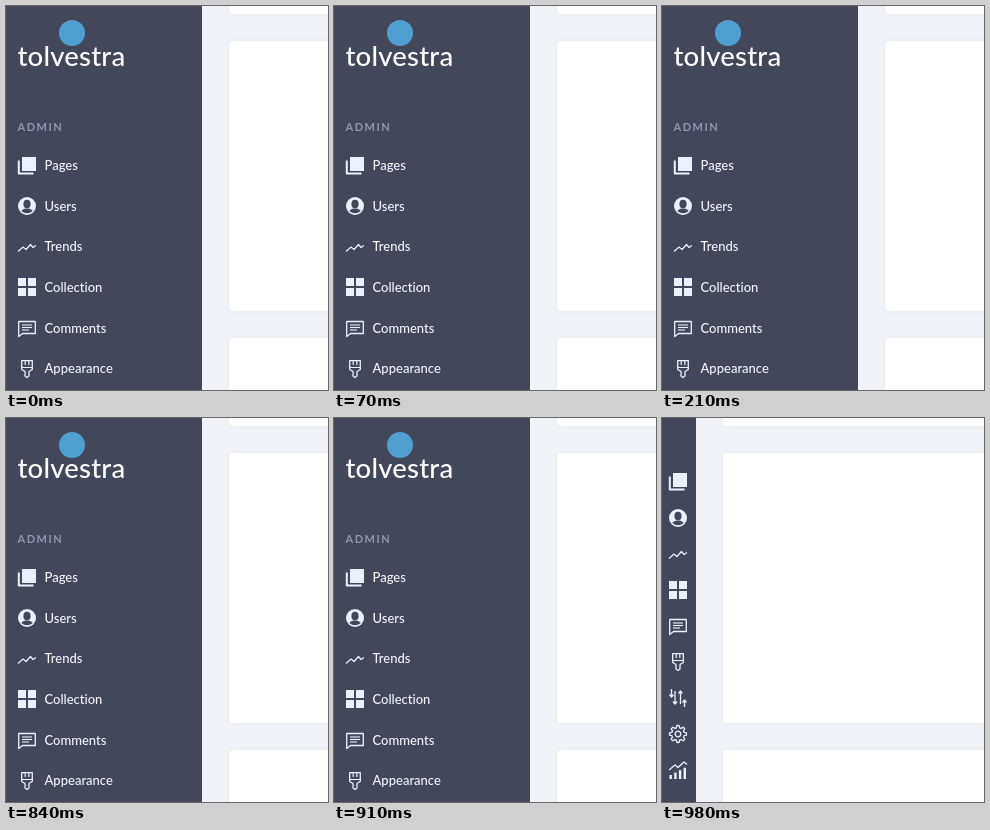
An HTML page with a canvas for the animation above (2.38 s loop, 322 by 384 pixels).

```html
<!DOCTYPE html>
<html lang="en">
<head>
<meta charset="utf-8">
<title>Collapsing sidebar</title>
<style>
  html, body { margin: 0; width: 100%; height: 100%; overflow: hidden; background: #f2f3f8; }
  canvas { display: block; width: 322px; height: 384px; }
</style>
</head>
<body>
<canvas id="stage"></canvas>
<script>
const W = 322, H = 384, LOOP = 2380, COLLAPSE_AT = 980;
const SIDEBAR = '#42485a', PAGE = '#f2f3f8', ICON = '#e9f1fb';
const ICONS = ['pages', 'user', 'trend', 'grid', 'comment', 'brush', 'arrows', 'gear', 'chart'];
const LABELS = ['Pages', 'Users', 'Trends', 'Collection', 'Comments', 'Appearance'];

const canvas = document.getElementById('stage');
const ctx = canvas.getContext('2d');
const ratio = window.devicePixelRatio || 1;
canvas.width = W * ratio;
canvas.height = H * ratio;
ctx.scale(ratio, ratio);

function stroke(path, width = 1.3) {
  ctx.lineWidth = width;
  ctx.stroke(new Path2D(path));
}

function oval(x, y, rx, ry, color) {
  ctx.fillStyle = color;
  ctx.beginPath();
  ctx.ellipse(x, y, rx, ry, 0, 0, Math.PI * 2);
  ctx.fill();
}

function text(str, x, y, font, color, spacing = 0) {
  ctx.font = font + ' Lato, sans-serif';
  ctx.letterSpacing = spacing + 'px';
  ctx.fillStyle = color;
  ctx.fillText(str, x, y);
}

// Each icon is drawn around its own centre.
const draw = {
  pages() {
    ctx.fillRect(-5, -9, 14, 14);
    stroke('M-8.2 -5.5V7.6H6.5', 2);
  },
  user() {
    oval(0, 0, 9, 9, ICON);
    oval(0, -2, 3.6, 4.3, SIDEBAR);
    ctx.fill(new Path2D('M-5.8 5Q-4.5 3.3 -1.7 2.6H1.7Q4.5 3.3 5.8 5Q0 9.6 -5.8 5'));
  },
  trend() {
    stroke('M-9 4.5L-4 0L-1 2.5L3.5 -2.5L6 .5L9 -1.5', 1.2);
  },
  grid() {
    for (const x of [-9, 1])
      for (const y of [-9, 1]) ctx.fillRect(x, y, 8, 8);
  },
  comment() {
    stroke('M-8.3 -6.5H8.3V5.5H-4.5L-8.3 8.5Z');
    for (let i = 0; i < 3; i++) stroke(`M-5 ${i * 2.5 - 3}H${i < 2 ? 5 : 2}`, 1.1);
  },
  brush() {
    stroke('M-5.3 -8.3H5.3V.5L2 2.5V7L0 8.6L-2 7V2.5L-5.3 .5Z');
    stroke('M-5.3 -1.5H5.3M-1.8 -8V-4M1.8 -8V-4', 1.2);
  },
  arrows() {
    arrow(-6.5, -9, -1);
    arrow(-3, -7, 6);
    arrow(2.5, 6, -7);
    arrow(6.5, 9, 2);
  },
  gear() {
    const steps = 96;
    ctx.beginPath();
    for (let i = 0; i < steps; i++) {
      const a = i / steps * Math.PI * 2;
      const tooth = Math.max(-1, Math.min(1, Math.cos(8 * a) * 2));
      const r = 7.4 + 1.1 * tooth;
      ctx.lineTo(Math.cos(a) * r, Math.sin(a) * r);
    }
    ctx.closePath();
    ctx.moveTo(2.8, 0);
    ctx.arc(0, 0, 2.8, 0, Math.PI * 2);
    ctx.lineWidth = 1.3;
    ctx.stroke();
  },
  chart() {
    for (let i = 0; i < 4; i++) {
      const h = 4 + i * 2.4;
      ctx.fillRect(-8.5 + i * 4.7, 9 - h, 2.4, h);
    }
    stroke('M-9 0L-3 -5L0 -2.5L6 -8L9 -5.5');
  }
};

function arrow(x, from, to) {
  const back = to - Math.sign(to - from) * 2.5;
  stroke(`M${x} ${from}V${to}M${x - 2} ${back}L${x} ${to}L${x + 2} ${back}`);
}

function drawIcon(name, x, y) {
  ctx.save();
  ctx.translate(x, y);
  ctx.fillStyle = ctx.strokeStyle = ICON;
  ctx.lineJoin = 'round';
  draw[name]();
  ctx.restore();
}

function card(x, y, h) {
  ctx.save();
  ctx.shadowColor = 'rgba(70, 80, 120, 0.07)';
  ctx.shadowBlur = 5 * ratio;
  ctx.fillStyle = '#fff';
  ctx.beginPath();
  ctx.roundRect(x, y, W, h, 4);
  ctx.fill();
  ctx.restore();
}

function drawLayout(sidebarWidth) {
  ctx.fillStyle = PAGE;
  ctx.fillRect(0, 0, W, H);
  for (let i = -1; i < 2; i++) card(sidebarWidth + 27, 35 + i * 297, 270);
  ctx.fillStyle = SIDEBAR;
  ctx.fillRect(0, 0, sidebarWidth, H);
}

function drawOpen() {
  drawLayout(196);
  oval(66, 27, 13, 13, '#4f9fd0');
  text('tolvestra', 11.5, 60, '500 27.5px', '#fff', 0.2);
  text('ADMIN', 11.5, 125, 'bold 11px', '#9298a9', 1.5);
  LABELS.forEach((label, i) => {
    drawIcon(ICONS[i], 21, Math.floor(160 + i * 40.65));
    // A hair of spacing keeps "ti" from joining into a ligature.
    text(label, 38.5, Math.round(164 + i * 40.68), '500 13px', '#f3f6fb', 0.01);
  });
}

function drawCollapsed() {
  drawLayout(34);
  ICONS.forEach((icon, i) => drawIcon(icon, 16, Math.floor(64 + i * 36.1)));
}

const start = performance.now();
function frame() {
  const t = (performance.now() - start) % LOOP;
  if (t < COLLAPSE_AT) drawOpen();
  else drawCollapsed();
  requestAnimationFrame(frame);
}
frame();
</script>
</body>
</html>
```
